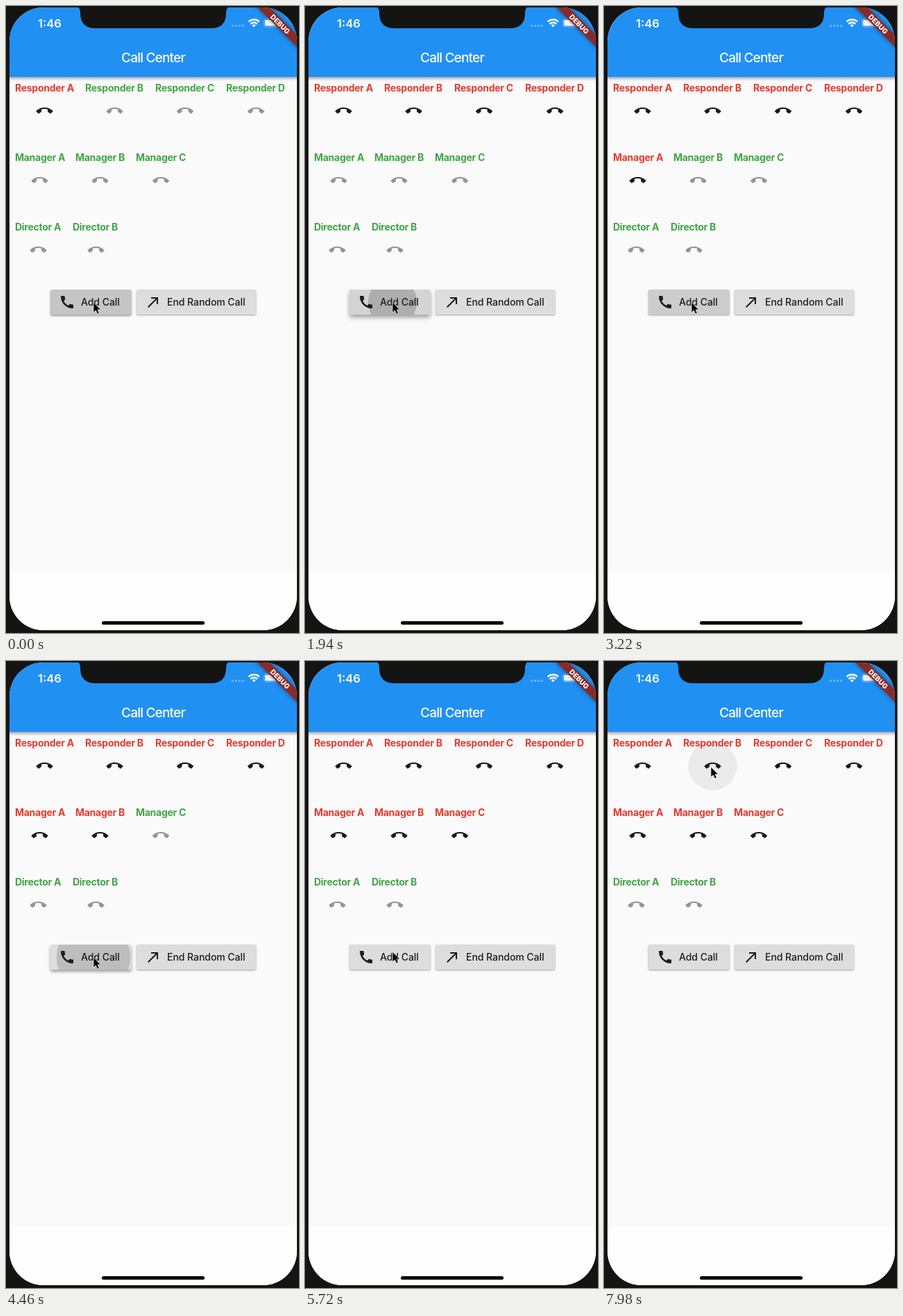
Write an HTML page that moves like this. It is 422x902 px and loops after 8 s.

```html
<!DOCTYPE html>
<html lang="en">
<head>
<meta charset="utf-8">
<title>Call Center</title>
<style>
  html, body { margin: 0; width: 100%; height: 100%; overflow: hidden; background: #141414; }
  svg { display: block; width: 100vw; height: 100vh; }
  text { font-family: Inter, Roboto, sans-serif; }
  .label { font-size: 14px; font-weight: 700; letter-spacing: -.28px; }
  .button { font-size: 14px; font-weight: 500; letter-spacing: -.05px; fill: #1c1c1c; }
</style>
</head>
<body>
<svg viewBox="0 0 422 902" xmlns="http://www.w3.org/2000/svg">
  <defs>
    <clipPath id="screen"><rect x="5" y="2" width="414" height="896" rx="49"/></clipPath>
    <clipPath id="addShape"><rect x="64" y="408" width="116.5" height="36" rx="2"/></clipPath>
    <linearGradient id="barShadow" x2="0" y2="1">
      <stop stop-color="#505058" stop-opacity=".5"/>
      <stop offset="1" stop-color="#808088" stop-opacity="0"/>
    </linearGradient>
    <path id="hangUp" d="M12 9c-1.6 0-3.15.25-4.6.72v3.1c0 .39-.23.74-.56.9-.98.49-1.87 1.12-2.66 1.85-.18.18-.43.28-.7.28-.28 0-.53-.11-.71-.29L.29 13.08c-.18-.17-.29-.42-.29-.7 0-.28.11-.53.29-.71C3.34 8.78 7.46 7 12 7s8.66 1.78 11.71 4.67c.18.18.29.43.29.71 0 .28-.11.53-.29.71l-2.48 2.48c-.18.18-.43.29-.71.29-.27 0-.52-.11-.7-.28-.79-.74-1.69-1.36-2.67-1.85-.33-.16-.56-.5-.56-.9v-3.1C15.15 9.25 13.6 9 12 9z"/>
  </defs>

  <g clip-path="url(#screen)">
    <rect width="422" height="902" fill="#fafafa"/>
    <rect y="814" width="422" height="88" fill="#fefefe"/>
    <rect width="422" height="102" fill="#2190f3"/>
    <rect y="102" width="422" height="6" fill="url(#barShadow)"/>
    <text x="212" y="81" text-anchor="middle" font-size="19" font-weight="500" letter-spacing="-.8" fill="#fff">Call Center</text>

    <circle id="tap" cx="156.5" cy="151" r="35" fill="#ebebeb"/>
    <g id="people"></g>

    <rect id="addBox" x="64" y="408" width="116.5" height="36" rx="2" fill="#dddddd"/>
    <g clip-path="url(#addShape)">
      <rect id="highlight" x="64" y="408" width="117" height="36"/>
      <circle id="ripple" cx="126" cy="426"/>
    </g>
    <path transform="translate(76 414)" fill="#1c1c1c" d="M20.01 15.38c-1.23 0-2.42-.2-3.53-.56-.35-.12-.74-.03-1.01.24l-1.57 1.97c-2.83-1.35-5.48-3.9-6.89-6.83l1.95-1.66c.27-.28.35-.67.24-1.02-.37-1.11-.56-2.3-.56-3.53 0-.54-.45-.99-.99-.99H4.19C3.65 3 3 3.24 3 3.99 3 13.28 10.73 21 20.01 21c.71 0 .99-.63.99-1.18v-3.45c0-.54-.45-.99-.99-.99z"/>
    <text class="button" x="108" y="431">Add Call</text>

    <rect id="endBox" x="188" y="408" width="172" height="36" rx="2" fill="#dddddd"/>
    <path transform="translate(200 414)" fill="#1c1c1c" d="M9 5v2h6.59L4 18.59 5.41 20 17 8.41V15h2V5z"/>
    <text class="button" x="232" y="431">End Random Call</text>

    <text x="46" y="30.5" font-size="16.5" font-weight="600" fill="#fff">1:46</text>
    <g fill="#fff" fill-opacity=".3">
      <rect x="325" y="27" width="3" height="3"/><rect x="330" y="27" width="3" height="3"/>
      <rect x="335" y="27" width="3" height="3"/><rect x="340" y="27" width="3" height="3"/>
    </g>
    <g fill="none" stroke="#fff" stroke-width="2.4">
      <path d="M349.5 22.7a11 11 0 0 1 15.4 0M352.3 25.8a7 7 0 0 1 9.8 0"/>
      <path d="M357.2 30.5l-2.6-2.7a3.7 3.7 0 0 1 5.2 0z" fill="#fff" stroke="none"/>
    </g>
    <rect x="371.5" y="18.5" width="24" height="11.5" rx="3.5" fill="none" stroke="#fff" stroke-opacity=".4"/>
    <rect x="373" y="20" width="21" height="8.5" rx="2" fill="#fff"/>

    <g transform="translate(419 2) rotate(45)">
      <rect x="-42" y="28" width="84" height="12" fill="#8a2a26" style="filter:drop-shadow(0 0 3px #0008)"/>
      <text y="37.7" text-anchor="middle" font-size="10" font-weight="800" fill="#fff">DEBUG</text>
    </g>
    <path d="M101 0Q107 2 107 9V10Q107 32 129 32H295Q317 32 317 10V9Q317 2 323 0Z" fill="#141414"/>
    <rect x="138" y="885" width="148" height="5" rx="2.5" fill="#080808"/>
  </g>
  <path id="cursor" d="M0 0V14.5L3.4 11.4L5.6 16.4L8.2 15.3L6 10.4H10.5Z" fill="#000" stroke="#fff" stroke-opacity=".7" stroke-width=".9"/>
</svg>
<script>
const LOOP = 8000;
const byId = id => document.getElementById(id);
const clamp = v => Math.max(0, Math.min(1, v));
const ramp = (t, from, to) => clamp((t - from) / (to - from));

// Each row: top, then label, left edge, icon centre and start of the call.
const rows = [
  [118, ["Responder A", 13, 55.5, -200], ["Responder B", 114, 156.5, 500],
        ["Responder C", 215, 258, 1200], ["Responder D", 317, 360, 1900]],
  [218, ["Manager A", 13, 48.5, 2960], ["Manager B", 100, 135.5, 4330], ["Manager C", 187, 223, 5200]],
  [318, ["Director A", 13, 46.5, Infinity], ["Director B", 96, 129.5, Infinity]]
];

function add(tag, attributes) {
  const node = document.createElementNS("http://www.w3.org/2000/svg", tag);
  for (const key in attributes) node.setAttribute(key, attributes[key]);
  return byId("people").appendChild(node);
}

const people = rows.flatMap(([y, ...row]) => row.map(([name, x, iconX, start]) => {
  const label = add("text", { class: "label", x, y: y + 5 });
  label.textContent = name;
  const icon = add("use", { href: "#hangUp", x: iconX - 12, y: y + 21 });
  return { label, icon, start };
}));
const releases = people.map(p => p.start).filter(isFinite);

// Time, x, y of the pointer tip.
const path = [
  [0, 126, 426.5], [5580, 126, 426.5], [5720, 126, 418.5], [5760, 126, 416], [5840, 126, 416],
  [6020, 143, 255], [6260, 143, 255], [7020, 164, 167], [7080, 163, 166], [7440, 154, 152.5], [LOOP, 154, 152.5]
];

function pointerAt(t) {
  const i = path.findIndex(p => p[0] > t);
  const a = path[i - 1], b = path[i], k = ramp(t, a[0], b[0]);
  return [a[1] + (b[1] - a[1]) * k, a[2] + (b[2] - a[2]) * k];
}

function setShadow(box, lift) {
  box.style.filter = `drop-shadow(0 ${1.5 + 2.5 * lift}px ${1 + 2 * lift}px rgba(0,0,0,.36))`;
}

function draw(t) {
  for (const { label, icon, start } of people) {
    const busy = t >= start;
    label.setAttribute("fill", busy ? "#e53a2f" : "#42a546");
    icon.setAttribute("fill", busy ? "#1a1a1a" : "#939398");
  }

  // Time relative to the release of the press now showing.
  const release = releases.find(r => t - r < 420 && t - r > -100);
  const since = release === undefined ? 1000 : t - release;
  setShadow(byId("addBox"), Math.min(ramp(since, -100, 20), 1 - ramp(since, 60, 270)));
  byId("highlight").setAttribute("opacity", .06 * Math.min(ramp(since, -100, 0), 1 - ramp(since, 0, 130)));
  const ripple = byId("ripple");
  ripple.setAttribute("r", Math.max(0, 27 + .2 * since));
  ripple.setAttribute("opacity", .18 * Math.min(ramp(since, -100, -50), 1 - ramp(since, 60, 420)));

  byId("tap").setAttribute("opacity", ramp(t, 7790, 7980));
  byId("cursor").setAttribute("transform", `translate(${pointerAt(t)})`);
}

setShadow(byId("endBox"), 0);
const begin = performance.now();
function tick() {
  draw((performance.now() - begin) % LOOP);
  requestAnimationFrame(tick);
}
tick();
</script>
</body>
</html>
```
